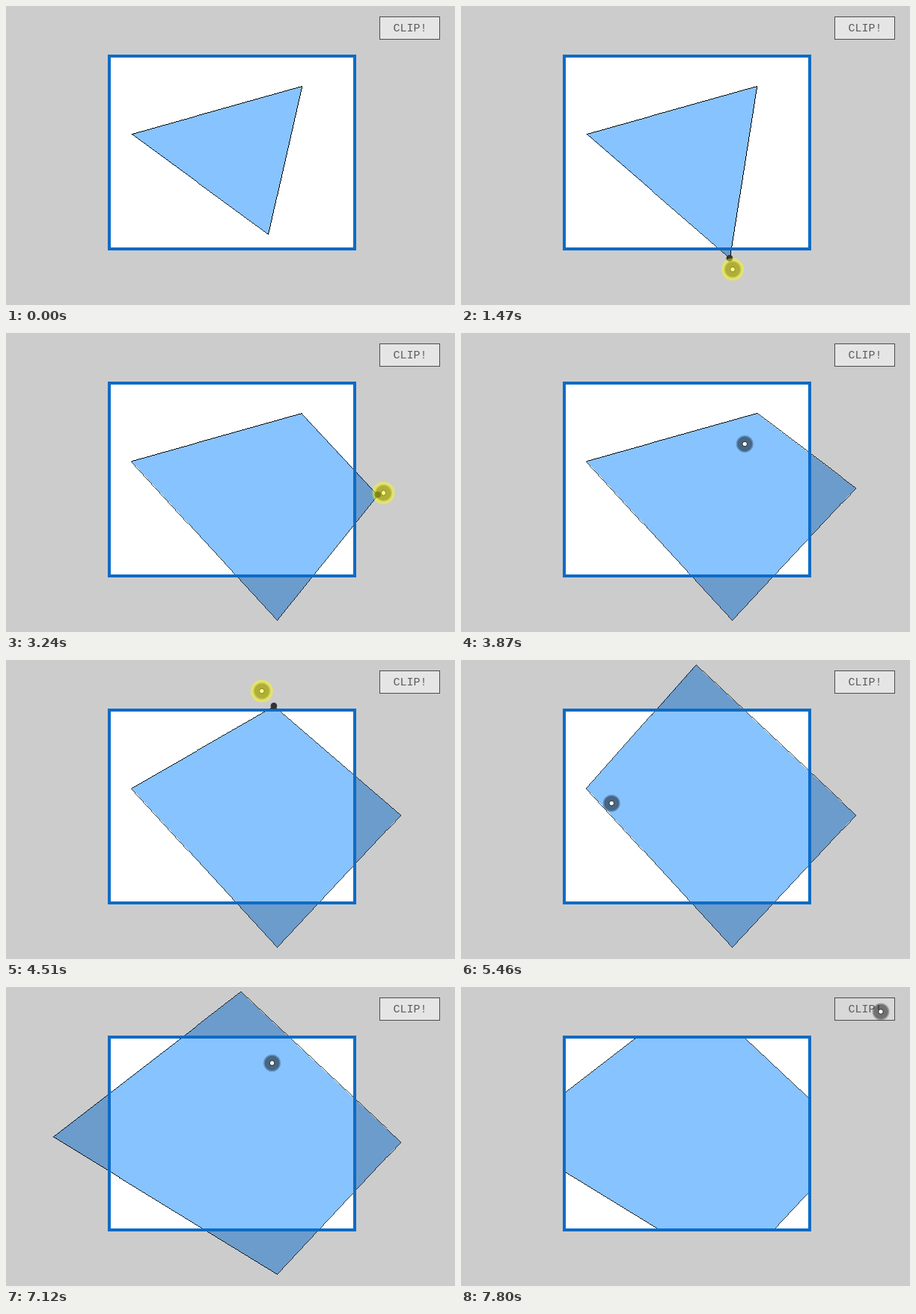
These frames come from a looping animation (600 by 400 pixels, 8000 ms). An HTML page:

```html
<!DOCTYPE html>
<html lang="en">
<head>
<meta charset="utf-8">
<title>Polygon clipping</title>
<style>
  html, body { margin: 0; width: 100%; height: 100%; overflow: hidden; background: #ccc; }
  svg { display: block; width: 600px; height: 400px; }
  text { font: 15px "Liberation Mono", monospace; fill: #5c5c5c; }
</style>
</head>
<body>
<svg viewBox="0 0 600 400">
  <clipPath id="window"><rect x="138" y="67" width="328" height="258"/></clipPath>
  <rect width="600" height="400" fill="#fff"/>
  <g id="shape" shape-rendering="crispEdges">
    <polygon id="fill" fill="#87c3ff"/>
    <g id="outline" stroke="#000"><line/><line/><line/><line/></g>
  </g>
  <path d="M0 0H600V400H0ZM138 67V325H466V67Z" fill-opacity=".2"/>
  <rect x="138" y="67" width="328" height="258" fill="none" stroke="#0f6bc4" stroke-width="4"/>
  <rect id="button" x="499.5" y="14.5" width="80" height="30" stroke="#4c4c4c"/>
  <text x="517.5" y="34">CLIP!</text>
  <circle id="handle" r="4.3" fill="#333"/>
  <g id="cursor">
    <circle r="11.5" fill-opacity=".25"/>
    <circle r="10" fill-opacity=".3"/>
    <circle r="3.3" fill="#fff" stroke="#222"/>
    <circle id="halo" r="15" fill="#ff0" fill-opacity=".46"/>
  </g>
</svg>
<script>
const LOOP = 8000;
const START = 530; // the pointer appears
const STEP = 79;   // time between redraws
const LAG = 33;    // the polygon trails the pointer

const entry = { x: 483, y: 392 };
const moves = [
  { from: 530, to: 1160, x: 350, y: 305 },
  { from: 1332, to: 1592, x: 372, y: 385 },
  { from: 1780, to: 2100, x: 362, y: 384 },
  { from: 2260, to: 2640, x: 378, y: 253 },
  { from: 2650, to: 3400, x: 527, y: 207 },
  { from: 3450, to: 3870, x: 378, y: 148 },
  { from: 3870, to: 4110, x: 395, y: 107 },
  { from: 4330, to: 4580, x: 313, y: 6 },
  { from: 4950, to: 5440, x: 201, y: 192 },
  { from: 5450, to: 5740, x: 167, y: 171 },
  { from: 5860, to: 6390, x: 62, y: 200 },
  { from: 6690, to: 7400, x: 561, y: 33 }
];

// In drawing order; the right corner is pulled out of an edge
const corners = [
  { home: { x: 167, y: 171 }, grab: 5820, drop: 6690 },
  { home: { x: 395, y: 107 }, grab: 4320, drop: 4950 },
  { grab: 2650, drop: 3450 },
  { home: { x: 350, y: 305 }, grab: 1390, drop: 2260 }
];
const click = { grab: 7640, drop: 7790 };
const CLIPPED = 7715;

const el = id => document.getElementById(id);
const [shape, fill, button, handle, cursor, halo] =
  ["shape", "fill", "button", "handle", "cursor", "halo"].map(el);
const lines = [...el("outline").children];

const set = (node, attrs) => {
  for (const name in attrs) node.setAttribute(name, attrs[name]);
};
const show = (node, on) => set(node, { visibility: on ? "visible" : "hidden" });
const place = (node, { x, y }) => set(node, { transform: `translate(${x} ${y})` });
const ease = u => u * u * (3 - 2 * u);
const held = (t, { grab, drop }) => t >= grab && t < drop;

function pointer(t) {
  let { x, y } = entry;
  for (const move of moves) {
    if (t < move.from) break;
    const k = ease(Math.min(1, (t - move.from) / (move.to - move.from)));
    x += (move.x - x) * k;
    y += (move.y - y) * k;
  }
  return { x, y };
}

function corner({ home, grab, drop }, t) {
  return t < grab ? home : pointer(Math.min(t - LAG, drop));
}

// Width that makes a slanted line exactly one pixel thick along its minor axis
function drawEdge(line, a, b) {
  const dx = b.x - a.x, dy = b.y - a.y;
  set(line, {
    x1: a.x + .5, y1: a.y + .5, x2: b.x + .5, y2: b.y + .5,
    "stroke-width": Math.max(Math.abs(dx), Math.abs(dy)) / Math.hypot(dx, dy)
  });
}

function draw() {
  const now = performance.now() % LOOP;
  const t = START + STEP * Math.floor((now - START + 8) / STEP);
  const active = t >= START;
  const pos = pointer(t);
  const points = corners.map(c => corner(c, t)).filter(Boolean);
  const pressed = [...corners, click].some(c => held(t, c));
  const clipped = t >= CLIPPED;

  set(fill, { points: points.map(({ x, y }) => `${x + .5},${y + .5}`).join(" ") });
  lines.forEach((line, i) => {
    show(line, i < points.length);
    if (i < points.length) drawEdge(line, points[i], points[(i + 1) % points.length]);
  });
  set(shape, { "clip-path": clipped ? "url(#window)" : "none" });
  set(button, { fill: clipped ? "#d8d8d8" : "#e5e5e5" });

  const reach = pressed ? 40 : 12;
  const near = points.find(({ x, y }) => Math.hypot(x - pos.x, y - pos.y) < reach);
  show(handle, active && near);
  if (near) place(handle, near);
  show(cursor, active);
  place(cursor, pos);
  show(halo, active && pressed);
  requestAnimationFrame(draw);
}
draw();
</script>
</body>
</html>
```
